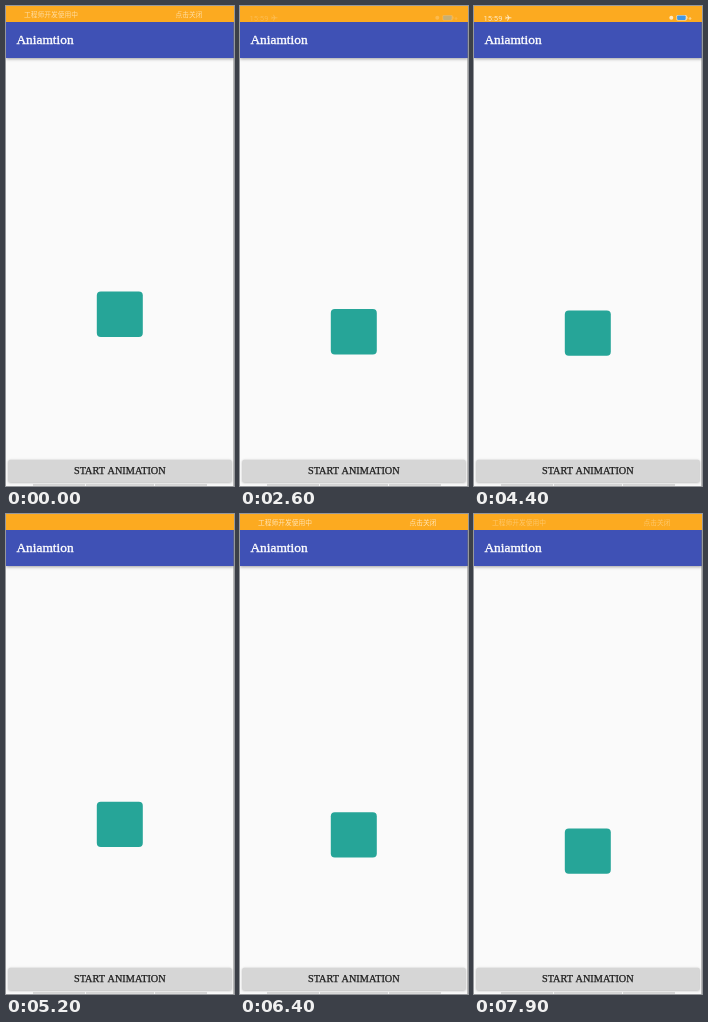
Recreate the animation shown at these times as an HTML page with a canvas. Size 228 px wide and 480 px high, loop 8 s.

```html
<!DOCTYPE html>
<html lang="zh-CN">
<head>
<meta charset="utf-8">
<title>Animation</title>
<style>
html, body { margin: 0; width: 100%; height: 100%; overflow: hidden; background: #fafafa; }
canvas { display: block; width: 228px; height: 480px; }
</style>
</head>
<body>
<canvas id="stage"></canvas>
<script>
const W = 228, H = 480, LOOP = 8000;
const canvas = document.getElementById('stage');
const ctx = canvas.getContext('2d');
const ratio = window.devicePixelRatio || 1;
canvas.width = W * ratio;
canvas.height = H * ratio;

const SERIF = '"Liberation Serif", serif';
const CJK = '"Noto Sans CJK SC", "Noto Sans CJK", sans-serif';
const PALE = '#fff1d6';
const TAP = 1500, MOVE_START = 1530, MOVE_TIME = 2000, STATUS_CYCLE = 6000;

const clamp = v => Math.max(0, Math.min(1, v));
const ramp = (t, from, to) => clamp((t - from) / (to - from));

function rect(x, y, w, h, color) {
  ctx.fillStyle = color;
  ctx.fillRect(x, y, w, h);
}

function roundRect(x, y, w, h, r, color) {
  ctx.fillStyle = color;
  ctx.beginPath();
  ctx.roundRect(x, y, w, h, r);
  ctx.fill();
}

function circle(x, y, r, color) {
  ctx.fillStyle = color;
  ctx.beginPath();
  ctx.arc(x, y, r, 0, Math.PI * 2);
  ctx.fill();
}

function label(text, x, y, font, color, weight = 0) {
  ctx.font = font;
  ctx.fillStyle = ctx.strokeStyle = color;
  ctx.fillText(text, x, y);
  if (weight) {
    ctx.lineWidth = weight;
    ctx.strokeText(text, x, y);
  }
}

function withShadow(blur, offset, alpha, draw) {
  ctx.save();
  ctx.shadowColor = `rgba(0,0,0,${alpha})`;
  ctx.shadowBlur = blur * ratio;
  ctx.shadowOffsetY = offset * ratio;
  draw();
  ctx.restore();
}

function plane(x, y) {
  const half = [[3, .4], [.9, .5], [-.7, 3], [-1.4, 3], [-.6, .5], [-2, .5], [-2.7, 1.4], [-3.2, 1.4], [-2.8, 0]];
  ctx.fillStyle = PALE;
  ctx.beginPath();
  half.forEach(([px, py]) => ctx.lineTo(x + px, y - py));
  half.reverse().forEach(([px, py]) => ctx.lineTo(x + px, y + py));
  ctx.fill();
}

function drawNotice(alpha) {
  ctx.globalAlpha = alpha;
  const font = '6.75px ' + CJK;
  label('工程师开发使用中', 18, 11.2, font, '#ffe4b4');
  label('点击关闭', 169.5, 11.2, font, '#ffe4b4');
  ctx.globalAlpha = 1;
}

function drawSystemIcons(alpha) {
  ctx.globalAlpha = alpha;
  label('15:59', 9.5, 14.5, '7.6px Roboto, sans-serif', PALE);
  plane(34.5, 11.8);
  circle(197.3, 11.7, 2, PALE);
  roundRect(202.5, 8.9, 10.2, 5.6, 1.3, PALE);
  roundRect(203.1, 9.5, 8.6, 4.4, .8, '#278ce8');
  rect(212.7, 10.7, .8, 2, PALE);
  label('+', 214.6, 13.6, '5.5px Roboto, sans-serif', PALE, .2);
  ctx.globalAlpha = 1;
}

function drawStatus(t) {
  rect(0, 0, W, 16, '#fcaa20');
  const c = t % STATUS_CYCLE;
  // The notice's fade-in wraps past the end of its cycle.
  const fadeIn = ramp(c < 1000 ? c + STATUS_CYCLE : c, 5300, 6100);
  const notice = c < 1000 || c >= 5300 ? fadeIn : 1 - ramp(c, 1700, 2100);
  const icons = ramp(c, 2400, 3200) * (1 - ramp(c, 4300, 5100));
  if (notice > 0) drawNotice(notice);
  if (icons > 0) drawSystemIcons(icons);
}

function drawButton(t) {
  const press = t >= TAP ? 1 - ramp(t, TAP + 100, 2300) : 0;
  withShadow(2.5 + press, .8, .28 + press * .08, () =>
    roundRect(2.4, 453.8, 223.2, 22.2, 1.5, '#d6d6d6'));
  if (press) roundRect(2.4, 453.8, 223.2, 22.2, 1.5, `rgba(0,0,0,${press * .02})`);
  ctx.textAlign = 'center';
  label('START ANIMATION', 113.8, 468, '10.25px ' + SERIF, '#1c1c1c', .25);
  ctx.textAlign = 'left';
  if (t >= TAP && t < TAP + 100) {
    circle(36.6, 463.5, 7, '#c9c9c9');
    circle(36.6, 463.5, 6.4, '#eeeeee');
  }
}

function iconTop(t) {
  const phase = Math.max(0, t - MOVE_START) / MOVE_TIME;
  return 285.6 + 31.4 * (1 - Math.cos(phase * Math.PI)) / 2;
}

function draw(t) {
  ctx.setTransform(ratio, 0, 0, ratio, 0, 0);
  rect(0, 0, W, H, '#fafafa');
  withShadow(3, 1, .36, () => rect(0, 16, W, 36, '#3f51b5'));
  drawStatus(t);
  label('Aniamtion', 10.4, 38, '13.4px ' + SERIF, '#fff', .35);
  roundRect(90.8, iconTop(t), 46, 45.4, 4, '#26a598');
  [[27, 52], [80, 68], [149, 52]].forEach(([x, w]) => rect(x, 478, w, 2, '#d9d9d9'));
  drawButton(t);
  rect(227, 16, 1, H, 'rgba(110,110,110,.45)');
}

const start = performance.now();
function frame() {
  draw((performance.now() - start) % LOOP);
  requestAnimationFrame(frame);
}
frame();
</script>
</body>
</html>
```
